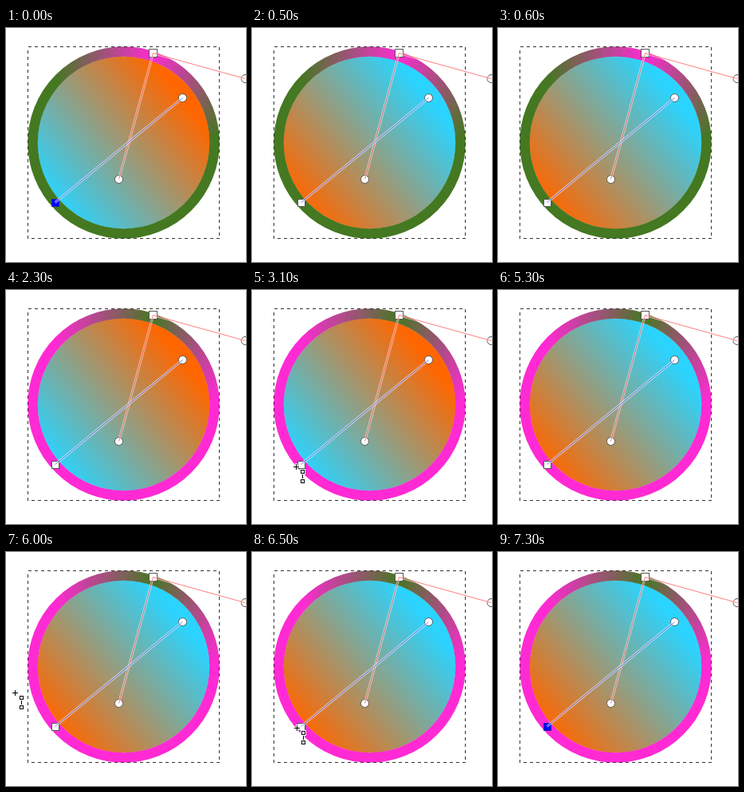
An HTML page for the animation above (8000 ms loop, 301 by 293 pixels).

```html
<!DOCTYPE html>
<html lang="en">
<head>
<meta charset="utf-8">
<title>Gradient editing</title>
<style>
  html, body { margin: 0; width: 100%; height: 100%; overflow: hidden; background: #fff; }
  svg { display: block; width: 301px; height: 293px; }
  .halo { stroke: #fff; stroke-opacity: .5; stroke-width: 3; }
  .red { stroke: #f00; stroke-opacity: .5; }
  .blue { stroke: #00f; stroke-opacity: .5; }
  .knot { fill: #fff; stroke: #555; }
</style>
</head>
<body>
<svg viewBox="0 0 301 293" fill="none">
  <defs>
    <linearGradient id="fill" gradientUnits="userSpaceOnUse" x1="61.5" y1="218.5" x2="221.5" y2="87.5">
      <stop offset="0"/><stop offset="1"/>
    </linearGradient>
    <radialGradient id="ring" gradientUnits="userSpaceOnUse" cx="0" cy="0" r="1"
      gradientTransform="matrix(115.5 32 -43 158 184.5 31.5)">
      <stop offset="0"/><stop offset="1"/>
    </radialGradient>
  </defs>
  <circle cx="147.5" cy="143.5" r="108" fill="url(#fill)"/>
  <circle cx="147.5" cy="143.5" r="114" stroke="url(#ring)" stroke-width="12.6"/>
  <rect x="27.5" y="23.5" width="240" height="240" stroke="#333" stroke-dasharray="4 4" shape-rendering="crispEdges"/>
  <g class="knot">
    <rect x="179.5" y="26.5" width="10" height="10"/>
    <rect id="start" x="57.5" y="214.5" width="9" height="9"/>
    <circle cx="221.5" cy="87.5" r="5"/>
    <circle cx="141.5" cy="189.5" r="5"/>
    <circle cx="300" cy="63.5" r="5"/>
  </g>
  <path class="halo" d="M141.5 189.5 184.5 31.5 300 63.5"/>
  <path class="red" d="M141.5 189.5 184.5 31.5 300 63.5"/>
  <path class="halo" d="M61.5 218.5 221.5 87.5"/>
  <path class="blue" d="M61.5 218.5 221.5 87.5"/>
  <g id="cursor" shape-rendering="crispEdges">
    <path d="M-4 .5H5M.5-4V5M8.5 6V19" stroke="#fff" stroke-width="3"/>
    <path d="M-3 .5H4M.5-3V4M8.5 6V19" stroke="#000"/>
    <path d="M6.5 4.5h4v4h-4zM6.5 16.5h4v4h-4z" fill="#fff" stroke="#fff" stroke-width="3"/>
    <path d="M6.5 4.5h4v4h-4zM6.5 16.5h4v4h-4z" fill="#fff" stroke="#000"/>
  </g>
</svg>
<script>
const LOOP = 8000;
const CYAN = '#2ad4ff', ORANGE = '#ff6600', PINK = '#ff2ad4', GREEN = '#447821';
const $ = id => document.getElementById(id);
const cursor = $('cursor'), start = $('start');

// Each row holds from its time until the next one.
const fills = [[0, CYAN, ORANGE], [500, ORANGE, CYAN], [2300, CYAN, ORANGE], [5300, ORANGE, CYAN]];
const rings = [[0, PINK, GREEN], [2300, GREEN, PINK]];
const picks = [[0, true], [500, false], [3800, true], [5300, false], [7200, true]];
const moves = [
  [0],
  [2600, 4, 172], [2700, 13, 183], [2800, 25, 196], [2900, 38, 207],
  [3000, 48, 215], [3100, 55, 221], [3200, 58, 223],
  [4000, 47, 202], [4100],
  [5900, 4, 166], [6000, 11, 176], [6100, 21, 188], [6200, 32, 200],
  [6300, 43, 210], [6400, 51, 217], [6500, 56, 220], [6600, 58, 220], [6700, 60, 220],
  [7000, 75, 227], [7200, 35, 194], [7300]
];

const at = (rows, t) => rows.findLast(row => row[0] <= t).slice(1);

function paint(id, colors) {
  $(id).querySelectorAll('stop').forEach((s, i) => s.setAttribute('stop-color', colors[i]));
}

function draw(t) {
  paint('fill', at(fills, t));
  paint('ring', at(rings, t));
  const [picked] = at(picks, t);
  start.style.fill = picked ? '#00f' : '#fff';
  start.style.stroke = picked ? '#22a' : '#555';
  const [x, y] = at(moves, t);
  cursor.style.display = x === undefined ? 'none' : '';
  if (x !== undefined) cursor.setAttribute('transform', `translate(${x} ${y})`);
}

const begin = performance.now();
function tick() {
  draw((performance.now() - begin) % LOOP);
  requestAnimationFrame(tick);
}
tick();
</script>
</body>
</html>
```
